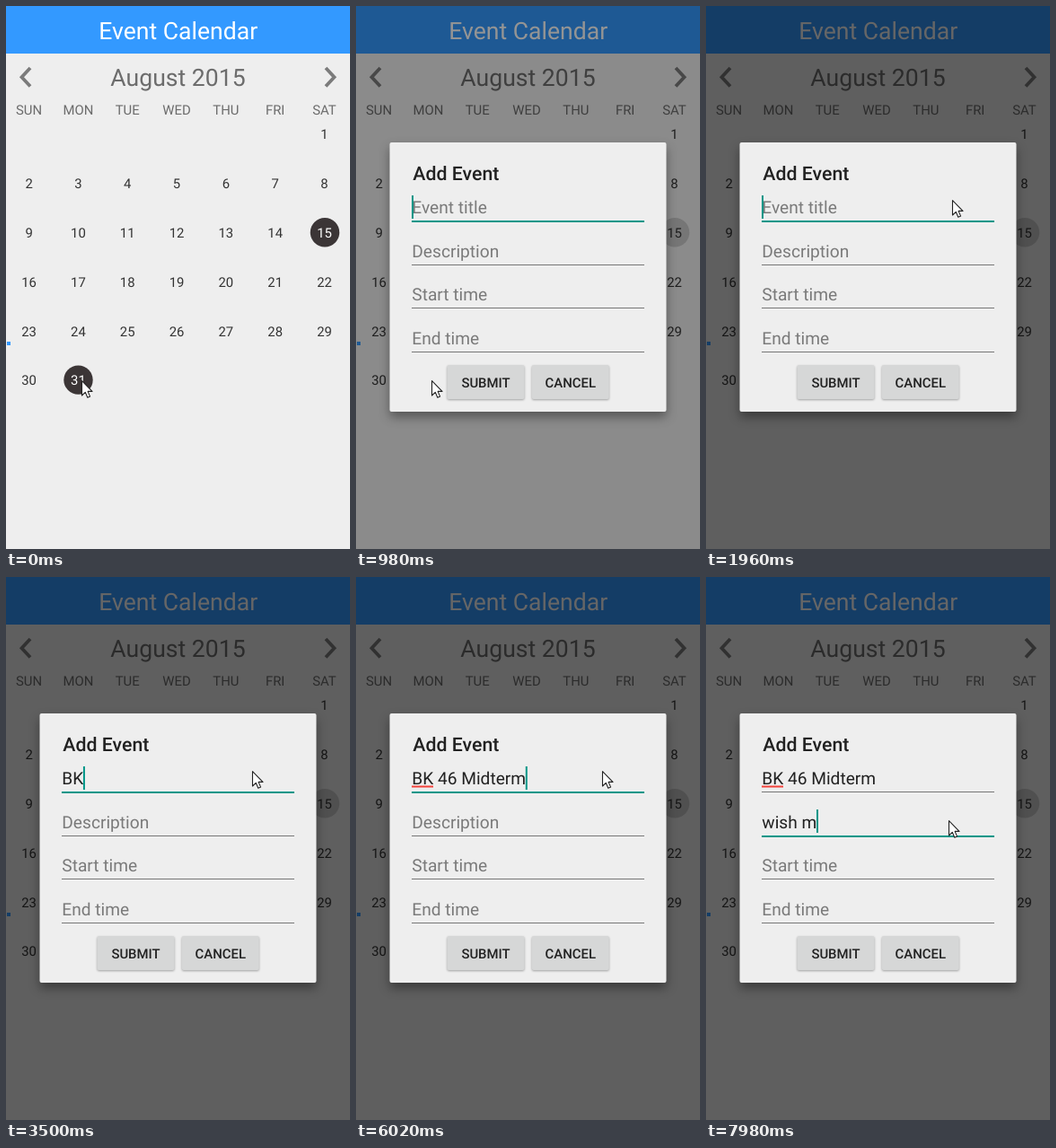
Recreate the animation shown at these times as an HTML page. Size 383 by 605 pixels, loop 8000 ms.

```html
<!DOCTYPE html>
<html lang="en">
<head>
<meta charset="utf-8">
<title>Event Calendar</title>
<style>
  html, body { margin: 0; width: 100%; height: 100%; overflow: hidden; background: #eee; }
  svg { display: block; width: 383px; height: 605px; }
  text { font-family: Roboto, sans-serif; font-size: 14.9px; white-space: pre; text-rendering: geometricPrecision; }
  .mid { text-anchor: middle; }
  .big { font-size: 26.6px; }
  .grey { fill: #6c6c6c; }
  .day { fill: #333; }
  .arrow { fill: none; stroke: #7b7b7b; stroke-width: 3.8; }
  .panel { fill: #eee; filter: drop-shadow(0 6px 6px rgba(0, 0, 0, .38)); }
  .heading { font-size: 21.3px; font-weight: 500; fill: #212121; }
  .field { font-size: 19.15px; }
  .hint { fill: #7a7a7a; }
  .value { fill: #212121; }
  .button { fill: #d6d7d7; filter: drop-shadow(0 1px 1px rgba(0, 0, 0, .32)); }
  .label { font-weight: 500; fill: #212121; }
</style>
</head>
<body>
<svg id="stage" viewBox="0 0 383 605"></svg>
<script>
const LOOP = 8000, TICK = 70, BLINK = 490;
const TEAL = '#009688', DARK = '#3b3536';
const stage = document.getElementById('stage');

function add(parent, tag, attrs, content) {
  const node = document.createElementNS('http://www.w3.org/2000/svg', tag);
  set(node, attrs);
  if (content) node.textContent = content;
  return parent.appendChild(node);
}
function set(node, attrs) {
  for (const key in attrs) node.setAttribute(key, attrs[key]);
}
function rect(parent, x, y, width, height, attrs) {
  return add(parent, 'rect', { x, y, width, height, ...attrs });
}
function label(parent, x, y, cls, content) {
  return add(parent, 'text', { x, y, class: cls }, content);
}

// Calendar page
const colX = col => 25.6 + col * 54.82;
const rowY = row => 143 + row * 54.8;

rect(stage, 0, 0, 383, 605, { fill: '#eee' });
rect(stage, 0, 0, 383, 53, { fill: '#39f' });
label(stage, 191.7, 36.7, 'mid big', 'Event Calendar').setAttribute('fill', '#fff');
label(stage, 191.5, 89, 'mid big grey', 'August 2015');
add(stage, 'path', { class: 'arrow', d: 'M27 69 L17.5 79.3 L27 89.5 M356 69 L365.5 79.3 L356 89.5' });
['SUN', 'MON', 'TUE', 'WED', 'THU', 'FRI', 'SAT'].forEach((name, col) =>
  label(stage, colX(col), 121.2, 'mid grey', name));

const today = add(stage, 'circle', { cx: 355, cy: 252.2, r: 16.2 });
add(stage, 'circle', { cx: 80.5, cy: 416.6, r: 16.2, fill: DARK });
let todayText;
for (let day = 1; day <= 31; day++) {
  const slot = day + 5;
  const node = label(stage, colX(slot % 7), rowY(Math.floor(slot / 7)) + 5.3, 'mid day', day);
  if (day === 15) todayText = node;
  if (day === 31) node.style.fill = '#fff';
}
rect(stage, 1, 374, 4, 4, { fill: '#39f' });
const shade = rect(stage, 0, 0, 383, 605, { fill: '#000' });

// Dialog
const dialog = add(stage, 'g', {});
rect(dialog, 37.5, 152, 308, 300, { rx: 2, class: 'panel' });
label(dialog, 63.3, 194, 'heading', 'Add Event');

const fields = ['Event title', 'Description', 'Start time', 'End time'].map((hint, i) => {
  const y = 231.3 + i * 48.4;
  return {
    y,
    hint: label(dialog, 62.3, y, 'field hint', hint),
    value: label(dialog, 62.3, y, 'field value'),
    line: rect(dialog, 62, Math.round(y + 8), 259, 1)
  };
});
const typo = rect(dialog, 62, 232.5, 24, 2, { fill: '#f4433c' });
const caret = rect(dialog, 62, 211, 2, 26, { fill: TEAL });

[[101.5, 'SUBMIT'], [195.8, 'CANCEL']].forEach(([x, name]) => {
  rect(dialog, x, 400, 86, 38, { rx: 2, class: 'button' });
  label(dialog, x + 43, 424.8, 'mid label', name);
});

const pointer = add(stage, 'path', {
  d: 'M.5 .7 V17 L4.3 13.4 L6.8 19.3 L9.6 18.1 L7.1 12.4 H12 Z',
  fill: '#fff', stroke: '#222', 'stroke-width': 1.1, 'stroke-linejoin': 'round'
});

// Timeline
const FOCUS_AT = 6860;
const typing = [
  { text: 'BK 46 Midterm',
    at: [3150, 3500, 3990, 4200, 4340, 4620, 5040, 5180, 5390, 5530, 5670, 5880, 6020] },
  { text: 'wish m', at: [7350, 7490, 7630, 7700, 7840, 7980] }
];
const fade = [[770, 0], [840, .28], [910, .67], [980, 1]];
const dim = [[840, 0], [910, .09], [980, .42], [1050, .6]];
const moves = [
  [1120, 84, 417], [1680, 273, 209], [1960, 274, 216],
  [6300, 274, 216], [6790, 270, 271]
];

const ease = p => p * p * (3 - 2 * p);

function track(keys, t, curve = p => p) {
  if (t <= keys[0][0]) return keys[0].slice(1);
  for (let i = 1; i < keys.length; i++) {
    const a = keys[i - 1], b = keys[i];
    if (t < b[0]) {
      const p = curve((t - a[0]) / (b[0] - a[0]));
      return a.slice(1).map((v, k) => v + (b[k + 1] - v) * p);
    }
  }
  return keys[keys.length - 1].slice(1);
}

function render(t) {
  const picked = t >= 70;
  today.setAttribute('fill', picked ? '#cacaca' : DARK);
  todayText.style.fill = picked ? '#333' : '#fff';
  shade.setAttribute('opacity', track(dim, t)[0]);
  dialog.setAttribute('opacity', track(fade, t)[0]);
  pointer.setAttribute('transform', `translate(${track(moves, t, ease)})`);

  const active = t < FOCUS_AT ? 0 : 1;
  fields.forEach((field, i) => {
    const on = i === active, script = typing[i];
    const count = script ? script.at.filter(at => t >= at).length : 0;
    field.value.textContent = count ? script.text.slice(0, count) : '';
    field.hint.setAttribute('visibility', count ? 'hidden' : 'visible');
    set(field.line, { height: on ? 2 : 1, fill: on ? TEAL : '#777' });
  });
  typo.setAttribute('visibility', t >= 4060 ? 'visible' : 'hidden');

  // The caret restarts its blink on focus and on every key
  const marks = [770, ...typing[0].at, FOCUS_AT, ...typing[1].at].filter(at => at <= t);
  const since = t - (marks.length ? marks[marks.length - 1] : 0);
  const field = fields[active];
  set(caret, {
    x: 62 + field.value.getComputedTextLength(),
    y: Math.round(field.y - 20.3),
    visibility: Math.floor(since / BLINK) % 2 ? 'hidden' : 'visible'
  });
}

const start = performance.now();
function frame() {
  const t = (performance.now() - start) % LOOP;
  render(Math.floor(t / TICK) * TICK);
  requestAnimationFrame(frame);
}
frame();
</script>
</body>
</html>
```
